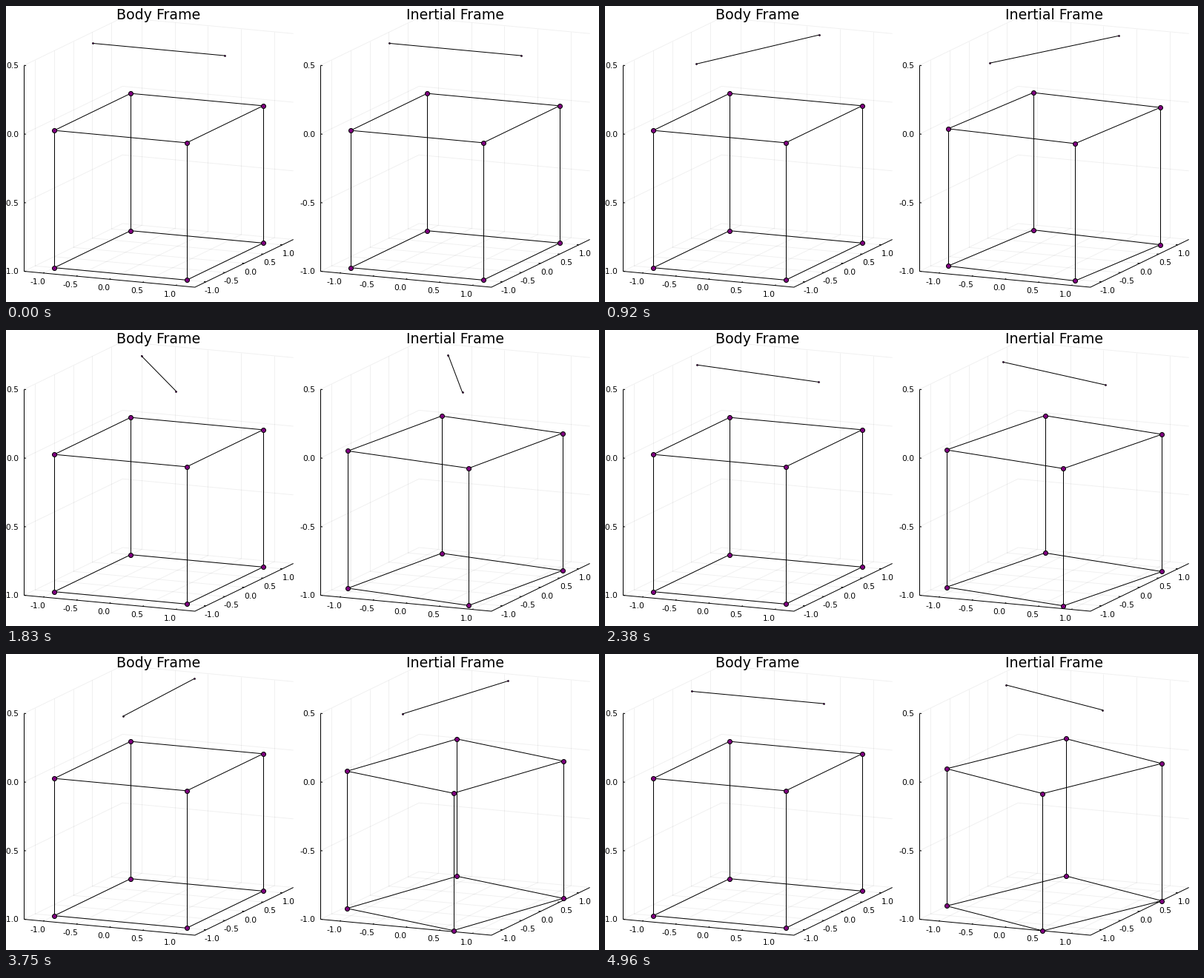
These frames come from a looping animation (800x400 px, 5000 ms). A matplotlib script:

```python
from itertools import product

import matplotlib.pyplot as plt
import numpy as np
from matplotlib.animation import FuncAnimation
from matplotlib.collections import LineCollection

W, H, DPI = 800, 400, 100
PX = 72 / DPI                  # points per pixel
LOOP, TICK_MS = 5000, 20
POSES = 120                    # the motion is stepped at 24 poses a second
LEAD = 14                      # ms, rounds pose changes to the clock
LIM = 1.29                     # half extent of the x and y axes
Z0, Z1 = -1.0, 0.5
TICKS = (-1.0, -0.5, 0.0, 0.5, 1.0)
RATIO = 17                     # body inertia over rotor inertia

plt.rcParams["font.family"] = "DejaVu Sans"
fig = plt.figure(figsize=(W / DPI, H / DPI), dpi=DPI, facecolor="white")
ax = fig.add_axes([0, 0, 1, 1])
ax.set_xlim(0, W)
ax.set_ylim(H, 0)
ax.axis("off")


def project(p, left):
    """Orthographic view of (x, y, z) rows as rows of pixels."""
    x, y, z = np.asarray(p, float).T
    return np.column_stack([left + 206 + 89.35 * x + 51.5 * y,
                            151.5 + 8.35 * x - 25 * y - 185.5 * z])


def lines(paths, left, **kw):
    segs = [project(p, left) for p in paths]
    style = dict(colors="black", linewidths=PX, capstyle="butt")
    return ax.add_collection(LineCollection(segs, **{**style, **kw}),
                             autolim=False)


def dots(pts, left, size, edge, **kw):
    return ax.plot(*project(pts, left).T, color="black", lw=PX, marker="o",
                   ms=size * PX, mew=edge * PX, mfc="purple", mec="black",
                   zorder=4, **kw)[0]


def label(x, y, s, size, ha):
    ax.text(x, y, s, fontsize=size * PX, ha=ha, va="baseline", zorder=5)


def spin(pts, angle):
    c, s = np.cos(angle), np.sin(angle)
    return pts @ np.array([[c, s, 0], [-s, c, 0], [0, 0, 1]])


def draw_axes(left, title):
    grid = []
    frame = [[(-LIM, -LIM, Z1), (-LIM, -LIM, Z0)],
             [(-LIM, -LIM, Z0), (LIM, -LIM, Z0), (LIM, LIM, Z0)]]
    d = 0.024 * LIM
    for t in TICKS:
        grid += [[(t, -LIM, Z0), (t, LIM, Z0)],
                 [(t, LIM, Z0), (t, LIM, Z1)],
                 [(LIM, t, Z0), (-LIM, t, Z0)],
                 [(-LIM, t, Z0), (-LIM, t, Z1)]]
        marks = [((t, -LIM, Z0), (0, d, 0), (-7.7, 15), "center"),
                 ((LIM, t, Z0), (-d, 0, 0), (8.2, 15), "center")]
        if t <= Z1:
            grid.append([(-LIM, -LIM, t), (-LIM, LIM, t), (LIM, LIM, t)])
            marks.append(((-LIM, -LIM, t), (d, 0, 0), (-7.2, 4), "right"))
        for p, step, shift, ha in marks:
            frame.append([p, np.add(p, step)])
            label(*(project([p], left)[0] + shift), f"{t:.1f}", 8 * 4 / 3, ha)
    lines(grid, left, alpha=0.06, zorder=1)
    lines(frame, left, zorder=2)
    label(left + 206, 18, title, 19, "center")


CUBE = np.array(list(product((-1, 1), (-1, 1), (-1, 0))), float)
EDGES = [[a, a | bit] for a in range(8) for bit in (1, 2, 4) if not a & bit]
BLADE = np.array([(-1, 0, 0.5), (1, 0, 0.5)])


class Craft:
    def __init__(self, left):
        self.left = left
        self.edges = lines(CUBE[EDGES], left, zorder=3)
        self.corners = dots(CUBE, left, 6, 1, ls="none")
        self.blade = dots(BLADE, left, 1.8, 0.8)

    def pose(self, body, rotor):
        pts = project(spin(CUBE, body), self.left)
        self.edges.set_segments(pts[EDGES])
        self.corners.set_data(*pts.T)
        self.blade.set_data(*project(spin(BLADE, body + rotor), self.left).T)


draw_axes(0, "Body Frame")
draw_axes(400, "Inertial Frame")
fixed, free = Craft(0), Craft(400)


def update(i):
    k = (i * TICK_MS + LEAD) * POSES // LOOP
    rotor = 2 * np.pi * k / (POSES - 1)
    fixed.pose(0, rotor)
    free.pose(-rotor / RATIO, rotor)
    return []


anim = FuncAnimation(fig, update, frames=LOOP // TICK_MS, interval=TICK_MS,
                     init_func=lambda: update(0), repeat=True, repeat_delay=0)
plt.show()
```
